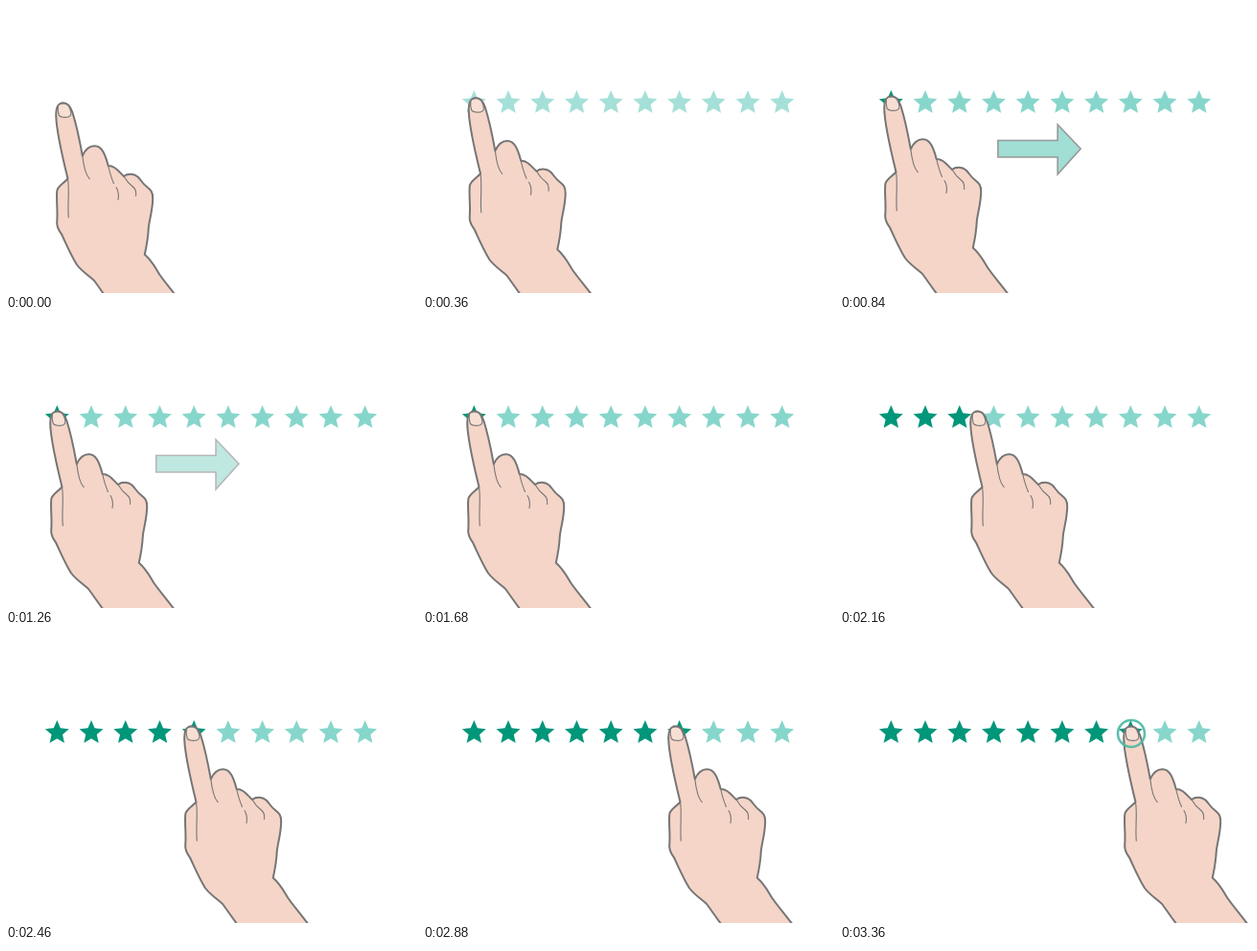
An HTML page for the animation above (3.48 s loop, 429x300 px).

```html
<!DOCTYPE html>
<html lang="en">
<head>
<meta charset="utf-8">
<title>Star rating</title>
<style>
  html, body { margin: 0; width: 100%; height: 100%; overflow: hidden; background: #fff; }
  svg { display: block; width: 100%; height: 100%; }
  #hand { fill: none; stroke: #757575; stroke-width: 2; stroke-linejoin: round; stroke-linecap: round; }
  #hand .skin { fill: #f5d5c7; }
  #hand .nail { fill: #f8dfd4; stroke-width: 1.1; }
  #hand .crease { stroke-width: 1.1; }
</style>
</head>
<body>
<svg viewBox="0 0 429 300">
  <g id="stars"></g>
  <path id="arrow" d="M164.9 140.5H227.2V123.9L251.2 149.2L227.2 175.8V158H164.9Z"
        fill="#8bd6ca" stroke="#7f7f7f" stroke-width="1.6"/>
  <g id="hand">
    <path class="skin" d="M58.5 173.5C53 151 47 127 46.3 109C45.6 99 48.500 94.400 53.700 94.200
      C58.500 94.200 61.200 98 63.300 104C67.500 117 71 134 73.800 149.500
      C76.500 143.500 81 139.200 86.500 139.200C94 139.200 97.500 148 100.700 160
      C108 160 111.500 166 117 171C121 167.800 127.500 168.200 131.500 171.500C135 175 136.500 178.500 140.500 181.500
      C145.500 185.500 147.200 187.500 147.200 194C147.200 206 143.500 217 142.800 225C142.300 236 140.500 245 138.800 252.700
      C147 260 149.500 266 154.500 274C160 282 168 291 183 311L109 311
      C99 299 92 288 86 280C79 274 73 270 68 263.500C61 252 57 242 52 231.500
      C49 227 47 225 47.200 219C48.200 207 46.500 198 47.200 187C47.200 181.500 53 179.500 58.500 173.500Z"/>
    <path class="nail" d="M48.400 97.500C47.700 101 48.300 104 49.200 107C50.500 109.800 57 109.700 59.500 108.800
      C62 107.800 62.300 105.500 61.500 102.500C60.500 98.500 58 95 54 95C51 95 49.200 96 48.400 97.500Z"/>
    <path class="crease" d="M58.500 173.500C60.500 187 58 200 59.300 214M73.800 149.500C75 160 77.500 170 81.200 173.700
      M100.700 160C102.500 168 104 173 106.500 178.500M109 182.500C111.700 186.500 112 190 111 195.500
      M117 171C119.500 175.500 123 179.500 127 182.500C129.500 184.500 130 187 129.600 191.500"/>
  </g>
  <circle id="ring" cx="304" cy="102" fill="none" stroke="#4bb8a3" stroke-opacity=".9" stroke-width="2.6"/>
</svg>
<script>
  const LOOP = 3480, STEP = 60, LAST = 56;
  const COUNT = 10, GAP = 35.72;
  const DARK = '#009679', LIGHT = '#87d6cb';
  const byId = id => document.getElementById(id);
  const [starGroup, arrow, hand, ring] = ['stars', 'arrow', 'hand', 'ring'].map(byId);
  const clamp = v => Math.min(1, Math.max(0, v));

  function starPoints(cx, cy, r) {
    return Array.from({ length: 10 }, (_, i) => {
      const a = i * Math.PI / 5, d = i % 2 ? r * 0.46 : r;
      return (cx + d * Math.sin(a)).toFixed(2) + ',' + (cy - d * Math.cos(a)).toFixed(2);
    }).join(' ');
  }

  const stars = Array.from({ length: COUNT }, (_, i) => {
    const star = document.createElementNS('http://www.w3.org/2000/svg', 'polygon');
    star.setAttribute('points', starPoints(53.3 + i * GAP, 101.2, 13.1));
    return starGroup.appendChild(star);
  });

  function draw(time) {
    const t = Math.min(LAST, Math.floor(time % LOOP / STEP)) * STEP;

    // The hand approaches the first star, then swipes to the eighth.
    const intro = clamp(t / 480);
    const swipe = t < 1740 ? 0 : Math.min(250, (t - 1620) / 6);
    hand.setAttribute('transform', `translate(${6 * (1 - intro) + swipe} ${7 * (1 - intro)})`);

    starGroup.setAttribute('opacity', intro);
    stars.forEach((star, i) => {
      star.setAttribute('fill', intro === 1 && swipe >= i * GAP - 8 ? DARK : LIGHT);
    });

    // Two decelerating slides with a fade-in.
    const showArrow = t >= 600 && t <= 1620;
    const p = ((t - 600) % 540 + STEP) / 540;
    const ease = 1 - (1 - p) ** 2;
    arrow.setAttribute('opacity', showArrow ? ease : 0);
    arrow.setAttribute('transform', `translate(${showArrow ? 33 * (ease - 0.8025) : 0} 0)`);

    ring.setAttribute('visibility', t >= 3120 ? 'visible' : 'hidden');
    ring.setAttribute('r', 14 + 4.7 * Math.max(0, 3360 - t) / STEP);
  }

  const start = performance.now();
  function tick() {
    draw(performance.now() - start);
    requestAnimationFrame(tick);
  }
  tick();
</script>
</body>
</html>
```
